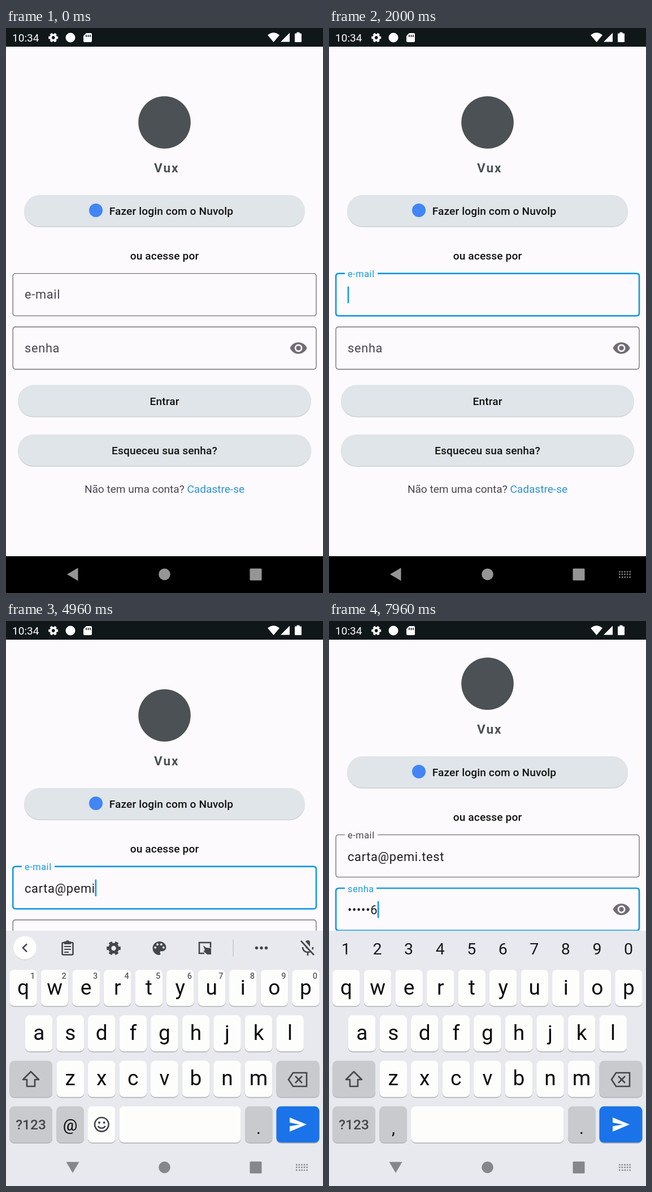
Write an HTML page that moves like this. It is 561 px wide and 998 px high and loops after 8 s.

```html
<!DOCTYPE html>
<html lang="pt">
<head>
<meta charset="utf-8">
<title>Login</title>
<style>
  html, body { margin: 0; width: 100%; height: 100%; overflow: hidden; background: #fdfafe; }
  svg { display: block; width: 100%; height: 100%; font-family: Roboto, sans-serif; }
  text { white-space: pre; }
  .mid { text-anchor: middle; }
  .label { font-size: 19.09px; font-weight: 500; letter-spacing: .136px; fill: #111; text-anchor: middle; }
  .input { font-size: 21.8px; letter-spacing: .68px; fill: #1d1b20; }
  .line { fill: none; stroke: #43464b; stroke-width: 2.6; }
  .key { font-size: 37px; fill: #0c0d0f; text-anchor: middle; }
</style>
</head>
<body>
<svg id="stage" viewBox="0 0 561 998"></svg>
<script>
const LOOP = 8000;
const EMAIL = 'carta@pemi.test', PASSWORD = '123456';
const EMAIL_FOCUS = 760, PASSWORD_FOCUS = 6005, KEYBOARD_OPEN = 2010, PASSWORD_KEYS = 6240;
const emailTimes = [2450, 2620, 2790, 2960, 3130, 3360, 3540, 4240, 4520, 4800, 5040, 5220, 5380, 5540, 5700];
const passwordTimes = [...PASSWORD].map((_, i) => 6650 + 240 * i);
const BLUE = '#1a9be2';

const $ = id => document.getElementById(id);
const clamp = v => Math.max(0, Math.min(1, v));
const easeOut = v => 1 - (1 - clamp(v)) ** 3;
const smooth = v => { v = clamp(v); return v * v * (3 - 2 * v); };
const show = (id, on) => $(id).setAttribute('visibility', on ? 'visible' : 'hidden');
const set = (id, attrs) => { for (const k in attrs) $(id).setAttribute(k, attrs[k]); };

const gear = (x, y, size, color) => `<g transform="translate(${x} ${y}) scale(${size})" fill="none" stroke="${color}">
  <circle r="5.4" stroke-width="4.2"/>
  <circle r="8.1" stroke-width="3.2" pathLength="12" stroke-dasharray="1.1 .9" stroke-dashoffset=".55"/></g>`;

const pill = (x, y, w, text, textX = 280.5) => `
  <rect x="${x}" y="${y + 1.6}" width="${w}" height="55.4" rx="27.7" fill="#cdd2d5"/>
  <rect x="${x}" y="${y}" width="${w}" height="55.4" rx="27.7" fill="#dfe5e8"/>
  <text class="label" x="${textX}" y="${y + 35}">${text}</text>`;

const field = (id, y) => `
  <path id="${id}Box" fill="none"/>
  <text id="${id}Label" x="33">${id === 'email' ? 'e-mail' : 'senha'}</text>
  <text id="${id}Text" class="input" x="33" y="${y + 46}"></text>
  <rect id="${id}Cursor" y="${y + 23}" width="2.7" height="29.5" fill="${BLUE}"/>`;

const keyBox = (x, y, w, fill) => `
  <rect x="${x}" y="${y + 1.6}" width="${w}" height="64" rx="8" fill="#b3b5b9"/>
  <rect x="${x}" y="${y}" width="${w}" height="64" rx="8" fill="${fill}"/>`;
const letterRow = (letters, firstX, y) => [...letters].map((c, i) => {
  const x = firstX + 55.55 * i;
  return keyBox(x - 24.3, y, 48.6, '#fdfdfc') + `<text class="key" x="${x}" y="${y + 43.5}">${c}</text>`;
}).join('');
const digits = (dx, y, style) => [...'1234567890'].map((c, i) =>
  `<text class="mid" x="${30 + 55.55 * i + dx}" y="${y}" style="${style}">${c}</text>`).join('');

const GRAY = '#c9cacd';
const toolbar = `
  <g id="tools">
    <g class="line"><rect x="99.500" y="568" width="19" height="21.500" rx="2"/><path d="M103 575h12M103 580h12M103 585h8" stroke-width="2"/></g>
    <path d="M103 566h3a3.200 3.200 0 0 1 6 0h3v5h-12z" fill="#43464b"/>
    ${gear(190.5, 578, 1.28, '#43464b')}
    <g transform="translate(255.500 562) scale(1.33)">
      <path fill="#43464b" d="M12 3a9 9 0 0 0 0 18c1.300 0 2-1.400 1.100-2.500-.9-1.100 0-2.500 1.100-2.500H16a5 5 0 0 0 5-5c0-4.400-4-8-9-8z"/>
      <g fill="#e7e9ee"><circle cx="6.500" cy="11" r="1.500"/><circle cx="9.500" cy="7" r="1.500"/><circle cx="14.500" cy="7" r="1.500"/><circle cx="17.500" cy="11" r="1.500"/></g>
    </g>
    <path class="line" d="M351 587h-9V568h20v9"/>
    <path d="M349 573l3 9 -3 1 7 6h7v-11l-9-1z" fill="#43464b"/>
    <path d="M402 562v31" stroke="#c5c8ce" stroke-width="1.500"/>
    <g fill="#43464b"><circle cx="443.500" cy="577.500" r="2.700"/><circle cx="452" cy="577.500" r="2.700"/><circle cx="460.500" cy="577.500" r="2.700"/></g>
  </g>
  <circle cx="33.500" cy="578.500" r="20.500" fill="#d0d2d7"/><circle cx="33.500" cy="577.300" r="20.500" fill="#fff"/>
  <path id="chevron" class="line" d="M-3.500-7l7 7-7 7"/>
  <rect x="530" y="564" width="8" height="15" rx="4" fill="#43464b"/>
  <path class="line" d="M525 576c0 12 18 12 18 0M534 585v6"/>
  <path d="M524 564l22 25" stroke="#e7e9ee" stroke-width="6"/>
  <path class="line" d="M522 565l23 25"/>`;

const keyboard = `
  <rect y="547" width="561" height="451" fill="#e7e9ee"/>
  ${letterRow('qwertyuiop', 30.5, 616)}${letterRow('asdfghjkl', 58.2, 696.3)}${letterRow('zxcvbnm', 113.7, 776.8)}
  ${keyBox(6.3, 776.8, 75.7, GRAY)}${keyBox(478.5, 776.8, 76, GRAY)}
  <path class="line" d="M44 796l14 14h-7v12H37v-12h-7z" stroke-linejoin="round"/>
  <path class="line" d="M508 798h24v24h-24l-8-12zM512 804l12 12M524 804l-12 12"/>
  ${keyBox(6.3, 857.3, 75.7, GRAY)}${keyBox(89.4, 857.3, 48.6, GRAY)}${keyBox(423, 857.3, 48.6, GRAY)}${keyBox(478.5, 857.3, 76, '#1a73e8')}
  <text class="mid" x="44" y="898" style="font-size:24.5px;font-weight:500;fill:#43464b">?123</text>
  <text class="mid" x="447" y="906" style="font-size:30px">.</text>
  <path d="M502 877l30 12.300L502 902v-9.500l18-3.200-18-3.200z" fill="#fff"/>
  <g id="emailKeys">
    ${toolbar}${digits(17, 632, 'font-size:14.5px;font-weight:500;fill:#5a5c60')}
    ${keyBox(145, 857.3, 48.6, '#fdfdfc')}${keyBox(200.5, 857.3, 215, '#fdfdfc')}
    <text class="mid" x="113.500" y="900" style="font-size:28.5px">@</text>
    <circle cx="169.300" cy="889.300" r="12.300" class="line"/>
    <circle cx="165" cy="886" r="2" fill="#43464b"/><circle cx="173.600" cy="886" r="2" fill="#43464b"/>
    <path class="line" d="M163 892c2 5 10.500 5 12.500 0" stroke-width="2.200"/>
  </g>
  <g id="passwordKeys">
    ${digits(0, 589, 'font-size:28.5px;fill:#17181a')}
    ${keyBox(145, 857.3, 270.5, '#fdfdfc')}
    <text class="mid" x="114" y="906" style="font-size:30px">,</text>
  </g>`;

$('stage').innerHTML = `
  <rect width="561" height="998" fill="#fdfafe"/>
  <g id="page">
    <circle cx="280.500" cy="166.700" r="46.300" fill="#4b5155"/>
    <text x="262" y="255" style="font-size:22.5px;font-weight:700;letter-spacing:2px;fill:#4b5155">Vux</text>
    ${pill(32, 295, 497, 'Fazer login com o Nuvolp', 292.5)}
    <circle cx="159" cy="322" r="12" fill="#4285f4"/>
    <text class="label" x="280.500" y="409">ou acesse por</text>
    ${field('email', 433.6)}${field('password', 528)}
    <g transform="translate(501.200 549) scale(1.3636)">
      <path d="M12 4.500C7 4.500 2.700 7.600 1 12c1.700 4.400 6 7.500 11 7.500s9.300-3.100 11-7.500c-1.700-4.400-6-7.500-11-7.500z" fill="#706b74"/>
      <circle cx="12" cy="12" r="4" fill="none" stroke="#fdfafe" stroke-width="2"/>
    </g>
    ${pill(21, 630.6, 519, 'Entrar')}${pill(21, 718, 519, 'Esqueceu sua senha?')}
    <text class="mid" x="280.500" y="821" style="font-size:19.09px;fill:#49454f">Não tem uma conta? <tspan fill="#2b93d1">Cadastre-se</tspan></text>
  </g>
  <rect width="561" height="33" fill="#101719"/>
  <g fill="#fff">
    <text x="11" y="24" style="font-size:19.1px">10:34</text>
    ${gear(83.7, 17, .88, '#fff')}
    <circle cx="114" cy="17" r="8.500"/>
    <path d="M142 9h8q2 0 2 2v12q0 2-2 2h-11q-2 0-2-2v-9z"/>
    <path d="M142 12v4M145.500 12v4M149 12v4" stroke="#101719" stroke-width="1.600"/>
    <path d="M463 12.500q10.500-8.500 21 0L473.500 25zM502 8.500v16h-16zM514.500 9.500v-2h5v2h2.500q1 0 1 1v13.500q0 1-1 1h-10q-1 0-1-1V10.500q0-1 1-1z"/>
  </g>
  <rect y="933" width="561" height="65"/>
  <g id="keyboard">${keyboard}</g>
  <g id="nav">
    <path id="back" d="M-10 0L9.500-11.500v23z"/>
    <circle cx="280.500" cy="965" r="10.300"/>
    <rect x="431.500" y="954.700" width="21" height="21" rx="1.500"/>
    <path id="imeIcon" d="M513 960.500h21M513 965h21M513 970h3M518 970h11M531.300 970h3" fill="none" stroke="#85878b" stroke-width="2.300" stroke-dasharray="2.500 2.100"/>
  </g>`;

const boxPath = (y, gapEnd) => {
  const [l, r, b, c] = [12.2, 549, y + 74.8, 5];
  return `M${gapEnd} ${y}H${r - c}q${c} 0 ${c} ${c}V${b - c}q0 ${c} ${-c} ${c}H${l + c}q${-c} 0 ${-c} ${-c}V${y + c}q0 ${-c} ${c} ${-c}H28`;
};

function drawField(id, y, t, { start, end, floatStart, gapEnd, value, lastKey }) {
  const active = t >= start, focused = active && t < end;
  const lift = smooth((t - floatStart) / 150);
  set(id + 'Box', {
    d: boxPath(y, active ? gapEnd : 28),
    stroke: focused ? BLUE : '#777279',
    'stroke-width': focused ? 2.73 : 1.4
  });
  set(id + 'Label', {
    y: y + 44.6 - 38 * lift,
    'font-size': 21.8 - 5.44 * lift,
    'letter-spacing': .68 - .135 * lift,
    fill: focused ? BLUE : '#49454f'
  });
  const text = $(id + 'Text');
  if (text.textContent !== value) text.textContent = value;
  set(id + 'Cursor', { x: 32.7 + (value ? text.getComputedTextLength() : 0) });
  show(id + 'Cursor', focused && (t - Math.max(start, lastKey)) % 1000 < 500);
}

const countTyped = (times, t) => times.filter(k => k <= t).length;

function draw(t) {
  const typed = countTyped(emailTimes, t), hidden = countTyped(passwordTimes, t);
  const springTime = Math.max(0, t - PASSWORD_FOCUS) / 50;
  const scroll = 56 * (1 - Math.exp(-springTime) * (1 + springTime));
  set('page', { transform: `translate(0 ${-scroll})` });

  drawField('email', 433.6, t, {
    start: EMAIL_FOCUS, end: PASSWORD_FOCUS, floatStart: 800, gapEnd: 86,
    value: EMAIL.slice(0, typed), lastKey: emailTimes[typed - 1] || 0
  });
  drawField('password', 528, t, {
    start: PASSWORD_FOCUS, end: LOOP, floatStart: 6085, gapEnd: 84,
    value: hidden ? '•'.repeat(hidden - 1) + PASSWORD[hidden - 1] : '', lastKey: passwordTimes[hidden - 1] || 0
  });

  const open = easeOut((t - KEYBOARD_OPEN) / 260);
  set('keyboard', { transform: `translate(0 ${451 * (1 - open)})` });
  const passwordMode = t >= PASSWORD_KEYS;
  $('emailKeys').style.display = passwordMode ? 'none' : '';
  $('passwordKeys').style.display = passwordMode ? '' : 'none';

  const collapsed = clamp((t - emailTimes[0]) / 150) - clamp((t - emailTimes[7]) / 150);
  set('tools', { opacity: 1 - collapsed });
  set('chevron', { transform: `translate(33.5 577.3) scale(${collapsed > .5 ? 1 : -1} 1)` });

  set('nav', { fill: open > .3 ? '#85878c' : '#959595' });
  set('back', { transform: `translate(118 965) rotate(${-90 * open})` });
  show('imeIcon', t >= 1960);
}

function frame(now) {
  draw(now % LOOP);
  requestAnimationFrame(frame);
}
draw(0);
requestAnimationFrame(frame);
</script>
</body>
</html>
```
